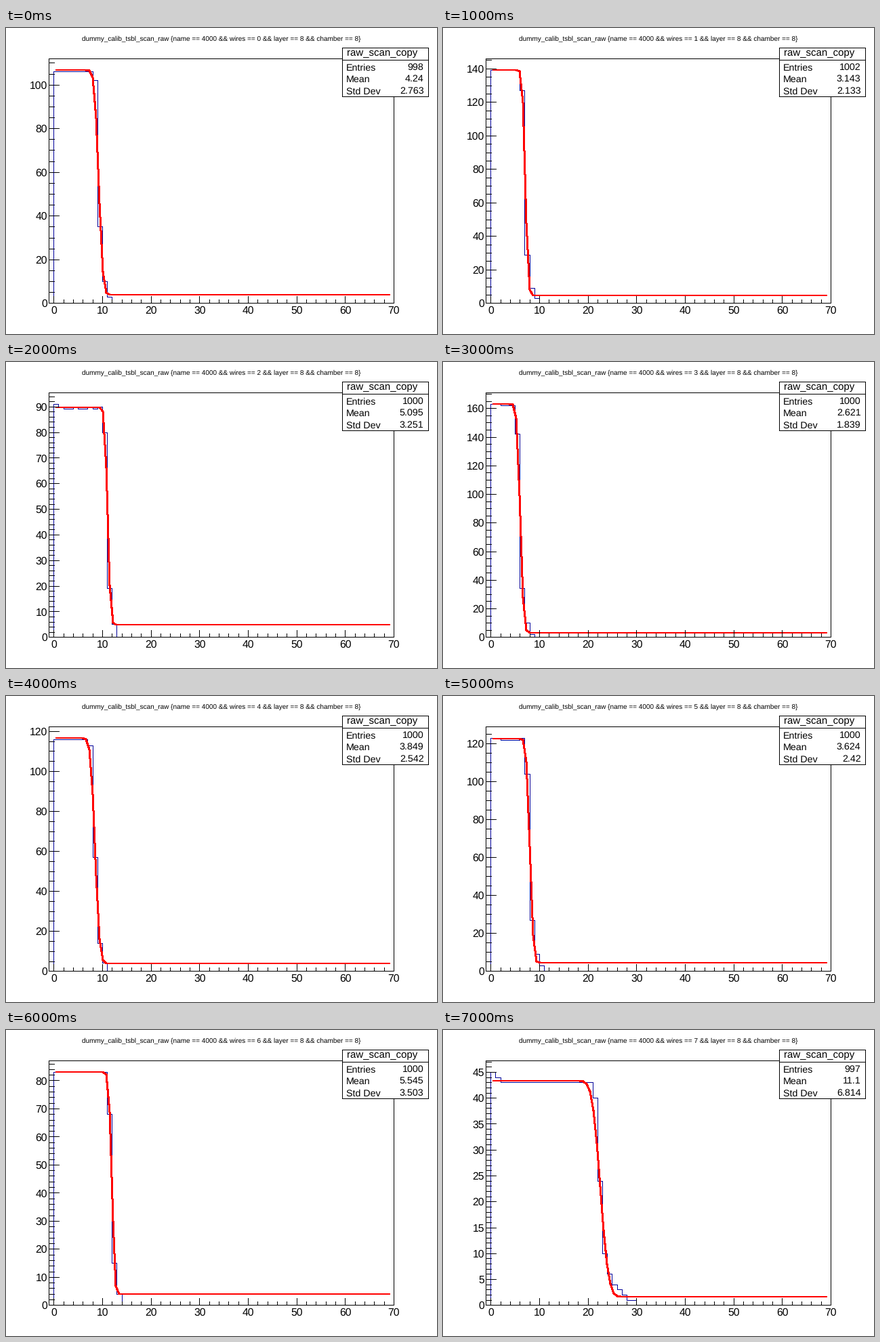
A matplotlib script for the animation above (8 s loop, 636 px wide and 452 px high).

```python
import math

import numpy as np
import matplotlib.pyplot as plt
from matplotlib.animation import FuncAnimation
from matplotlib.patches import Rectangle

W, H, DPI = 636, 452, 64
PX = 72 / DPI                      # one pixel in points
LEFT, RIGHT, TOP, BOTTOM = 0.1 * W, 0.9 * W, 0.1 * H, 0.9 * H
XMIN, XMAX = -1, 70
BLUE = "#000099"

# per wire: total entries, first bin, bins of the falling edge
SCANS = [
    (998, 106, [102, 35, 10, 3]),
    (1002, 139, [127, 29, 9, 3]),
    (1000, 91, [80, 19, 5]),
    (1000, 163, [142, 34, 10, 2]),
    (1000, 116, [113, 57, 14, 4]),
    (1000, 123, [104, 27, 9, 3]),
    (1000, 83, [68, 15, 4]),
    (997, 45, [40, 24, 10, 6, 4, 3, 2, 1, 1]),
]

plt.rcParams["font.family"] = "Liberation Sans"
plt.rcParams["text.hinting"] = "none"
fig = plt.figure(figsize=(W / DPI, H / DPI), dpi=DPI, facecolor="white")
ax = fig.add_axes([0, 0, 1, 1])


def histogram(entries, first, edge):
    """Spread the entries left of the edge evenly over the plateau."""
    rest = entries - first - sum(edge)
    bins = math.ceil(rest / first)
    level, extra = divmod(rest, bins)
    flat = np.full(bins, level)
    flat[np.ceil(np.linspace(0, bins - 1, extra)).astype(int)] += 1
    return np.concatenate([[first], flat, edge])


def fall(xs, centre, sigma):
    return np.array([math.erfc((x - centre) / sigma / math.sqrt(2)) / 2 for x in xs])


def fit_edge(counts):
    """Weighted least squares for height * fall + offset."""
    xs = np.arange(len(counts)) + 0.5
    weight = 1 / np.sqrt(counts)

    def solve(centre, sigma):
        sigma = max(sigma, 0.2)
        basis = np.column_stack([fall(xs, centre, sigma), np.ones(len(xs))])
        basis = basis * weight[:, None]
        coef = np.linalg.lstsq(basis, counts * weight, rcond=None)[0]
        error = ((basis @ coef - counts * weight) ** 2).sum()
        return error, centre, sigma, coef[0], coef[1]

    best = solve(counts.sum() / counts.max(), 0.6)
    step = 0.2
    while step > 0.002:
        near = min(solve(best[1] + i * step, best[2] + j * step)
                   for i in (-1, 0, 1) for j in (-1, 0, 1))
        if near[0] < best[0] - 1e-9:
            best = near
        else:
            step /= 2
    return best[1:]


def line(xs, ys, color="black", width=1, cap="projecting", z=1):
    """Hard-edged polyline through whole pixels."""
    shift = 0.5 * (width % 2)
    ax.plot(np.floor(xs) + shift, np.floor(ys) + shift, color=color, lw=width * PX,
            antialiased=False, snap=False, solid_capstyle=cap,
            solid_joinstyle="miter", zorder=z)


def text(x, y, s, size, ha="left"):
    ax.text(x, y, s, fontsize=size * PX, ha=ha, va="baseline", zorder=9)


def to_x(v):
    return LEFT + (np.asarray(v) - XMIN) * (RIGHT - LEFT) / (XMAX - XMIN)


def to_y(v, top):
    return BOTTOM - np.asarray(v) * (BOTTOM - TOP) / top


def ticks(top, span):
    """Tick values and whether each is major, at most ten major divisions."""
    pairs = [(5, 1), (10, 2), (20, 5)]
    major, minor = next(p for p in pairs if p[0] >= span / 10)
    for v in range(0, int(top) + 1, minor):
        yield v, v % major == 0


def draw_axes(ymax):
    line([LEFT, RIGHT, RIGHT, LEFT, LEFT], [BOTTOM, BOTTOM, TOP, TOP, BOTTOM], z=4)
    for v, major in ticks(XMAX, XMAX - XMIN):
        x = float(to_x(v))
        line([x, x], [BOTTOM, BOTTOM - (10.8 if major else 5.4)], z=4)
        if major:
            text(x, 421.5, str(v), 15.8, "center")
    for v, major in ticks(ymax, ymax):
        y = float(to_y(v, ymax))
        line([LEFT, LEFT + (15.3 if major else 7.6)], [y, y], z=4)
        if major:
            text(61, y + 5.5, str(v), 15.8, "right")


def draw_stats(counts):
    bins = np.arange(len(counts))
    total = counts.sum()
    mean = (bins * counts).sum() / total
    dev = math.sqrt((bins ** 2 * counts).sum() / total - mean ** 2)
    ax.add_patch(Rectangle((496, 29), 128, 73, fc="white", lw=0, zorder=6))
    line([496, 623, 623, 496, 496], [29, 29, 101, 101, 29], z=7)
    line([496, 623], [47, 47], z=7)
    text(555, 41, "raw_scan_copy", 15, "center")
    rows = [("Entries", total), ("Mean", mean), ("Std Dev", dev)]
    for i, (name, value) in enumerate(rows):
        text(501.5, 62.5 + 17.8 * i, name, 14.2)
        text(616.5, 61.5 + 17.8 * i, f"{value:.4g}", 14.2, "right")


def draw(wire):
    ax.clear()
    ax.set(xlim=(0, W), ylim=(H, 0))
    ax.axis("off")
    counts = histogram(*SCANS[wire])
    centre, sigma, height, offset = fit_edge(counts)
    xs = np.linspace(0.34, 69.25, 100)
    curve = height * fall(xs, centre, sigma) + offset
    ymax = 1.05 * max(counts.max(), curve.max())

    edges = np.repeat(np.arange(len(counts) + 1), 2)
    heights = np.concatenate([[0], np.repeat(counts, 2), [0]])
    line(to_x(edges), to_y(heights, ymax), BLUE, z=2)
    line(to_x(xs), to_y(curve, ymax), "red", 2, "butt", z=3)
    draw_axes(ymax)
    draw_stats(counts)
    text(317.5, 19, "dummy_calib_tsbl_scan_raw {name == 4000 && "
         f"wires == {wire} && layer == 8 && chamber == 8}}", 10, "center")
    return []


anim = FuncAnimation(fig, draw, frames=len(SCANS), init_func=lambda: [],
                     interval=1000, repeat=True, repeat_delay=0)
plt.show()
```
